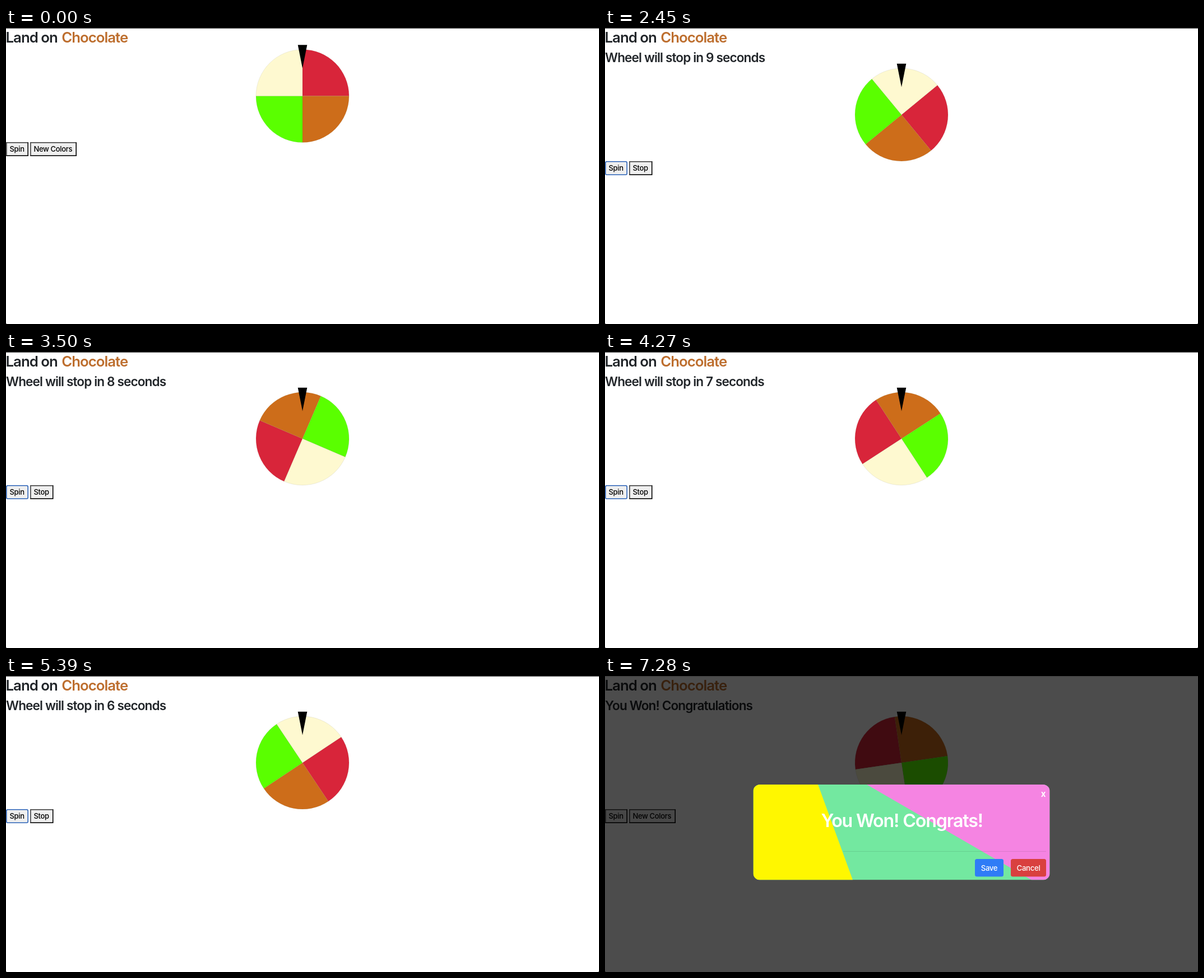
Animation of 1058x529 px, one loop 7350 ms. Source, as an HTML page with a canvas:

```html
<!DOCTYPE html>
<html lang="en">
<head>
<meta charset="utf-8">
<title>Color wheel</title>
<style>
  html, body { margin: 0; width: 100%; height: 100%; overflow: hidden; background: #fff; }
  canvas { display: block; width: 1058px; height: 529px; }
</style>
</head>
<body>
<canvas id="stage" width="1058" height="529"></canvas>
<script>
const ctx = document.getElementById('stage').getContext('2d');
const W = 1058, H = 529, LOOP = 7350, STEP = 70;
const FOCUS = 1470, SPIN = 1540, STOP = 5810, MODAL = 5880, TICK = 840;
const SLICES = ['#d8253a', '#cd6d1a', '#5aff00', '#fef9d0'];

// [time in ms, wheel angle in degrees]
const TURNS = [[1610, 0], [2450, 410.5], [3500, 923.2], [4270, 1316.9], [5390, 1856.3], [STOP, 2061.6]];

function wheelAngle(t) {
  if (t <= TURNS[0][0]) return 0;
  for (let i = 1; i < TURNS.length; i++) {
    const [t0, a0] = TURNS[i - 1], [t1, a1] = TURNS[i];
    if (t <= t1) return a0 + (a1 - a0) * (t - t0) / (t1 - t0);
  }
  return TURNS[TURNS.length - 1][1];
}

function text(str, x, y, size, { weight = 500, color = '#000', track = -0.025, align = 'left' } = {}) {
  ctx.font = `${weight} ${size}px Inter, "Liberation Sans", sans-serif`;
  ctx.letterSpacing = `${track * size}px`;
  ctx.textAlign = align;
  ctx.fillStyle = color;
  ctx.fillText(str, x, y);
}

function polygon(color, ...points) {
  ctx.beginPath();
  points.forEach(([x, y]) => ctx.lineTo(x, y));
  ctx.closePath();
  ctx.fillStyle = color;
  ctx.fill();
}

function roundBox(x, y, w, h, r, color) {
  ctx.beginPath();
  ctx.roundRect(x, y, w, h, r);
  ctx.fillStyle = color;
  ctx.fill();
}

function button(label, x, y, w, focused) {
  const h = 25, b = 1.6;
  if (focused) {
    roundBox(x, y, w, h, 3, '#2b62b8');
    roundBox(x + b, y + b, w - 2 * b, h - 2 * b, 1.5, '#efefef');
  } else {
    polygon('#000', [x, y], [x + w, y], [x + w, y + h], [x, y + h]);
    polygon('#4c4c4c', [x, y], [x + w, y], [x + w - b, y + b], [x + b, y + b], [x + b, y + h - b], [x, y + h]);
    ctx.fillStyle = '#efefef';
    ctx.fillRect(x + b, y + b, w - 2 * b, h - 2 * b);
  }
  text(label, x + 6.4, y + 17.3, 13);
}

function wheel(cx, cy, degrees) {
  const r = 83, quarter = Math.PI / 2;
  ctx.save();
  ctx.translate(cx, cy);
  ctx.rotate(degrees * Math.PI / 180 - quarter);
  SLICES.forEach((color, i) => {
    ctx.beginPath();
    ctx.moveTo(0, 0);
    ctx.arc(0, 0, r, i * quarter, (i + 1) * quarter);
    ctx.closePath();
    ctx.fillStyle = color;
    ctx.fill();
    ctx.lineWidth = 0.5;
    ctx.strokeStyle = 'rgba(90, 90, 70, 0.2)';
    ctx.stroke();
  });
  ctx.restore();
  polygon('#000', [cx - 8.3, cy - 91.3], [cx + 8.3, cy - 91.3], [cx, cy - 49.5]);
}

function modal() {
  ctx.fillStyle = 'rgba(0, 0, 0, 0.7)';
  ctx.fillRect(0, 1, W, H - 1);

  const x = 264.5, y = 194, w = 529, h = 170.5;
  ctx.save();
  ctx.beginPath();
  ctx.roundRect(x, y, w, h, 12);
  ctx.clip();
  ctx.fillStyle = '#73e8a0';
  ctx.fillRect(x, y, w, h);
  polygon('#fff700', [x, y], [380, y], [442, y + h], [x, y + h]);
  polygon('#f584e2', [467, y], [x + w, y], [x + w, y + h], [761, y + h]);
  ctx.restore();

  ctx.fillStyle = 'rgba(0, 0, 0, 0.1)';
  ctx.fillRect(425, 313, 362, 1);

  const white = { color: '#fff' };
  text('You Won! Congrats!', 385.5, 269.5, 32.2, { ...white, weight: 600, track: -0.036 });
  text('x', 777.7, 215.5, 15, { ...white, weight: 700 });
  roundBox(660, 327, 51, 31.5, 3.5, '#2f7cf6');
  text('Save', 685.5, 347.8, 13.2, { ...white, align: 'center' });
  roundBox(724, 327, 63, 31.5, 3.5, '#d9403f');
  text('Cancel', 755.5, 347.8, 13.2, { ...white, align: 'center' });
}

function draw(t) {
  const started = t >= SPIN, stopped = t >= STOP;
  const wheelY = started ? 155 : 121.5;
  const buttonY = started ? 238 : 204;
  const heading = { weight: 600, color: '#212529', track: -0.039 };

  ctx.fillStyle = '#fff';
  ctx.fillRect(0, 0, W, H);
  ctx.fillStyle = '#3a3a3a';
  ctx.fillRect(0, 0, W, 1);
  ctx.fillRect(0, H - 1, 1, 1);
  ctx.fillRect(W - 1, H - 1, 1, 1);

  text('Land on', -0.5, 26.2, 25.8, heading);
  text('Chocolate', 99.3, 26.2, 25.8, { ...heading, color: '#bd6e2e' });
  if (started) {
    const left = 10 - Math.floor((t - SPIN) / TICK);
    const line = stopped ? 'You Won! Congratulations' : `Wheel will stop in ${left} seconds`;
    text(line, 0, 61.4, 22.6, heading);
  }

  wheel(529, wheelY, wheelAngle(t));
  button('Spin', 0, buttonY, 40, t >= FOCUS && !stopped);
  if (started && !stopped) button('Stop', 43, buttonY, 41.5);
  else button('New Colors', 43, buttonY, 83);

  if (t >= MODAL) modal();
}

const start = performance.now();
function frame() {
  const t = (performance.now() - start) % LOOP;
  draw(Math.floor(t / STEP) * STEP);
  requestAnimationFrame(frame);
}
frame();
</script>
</body>
</html>
```
